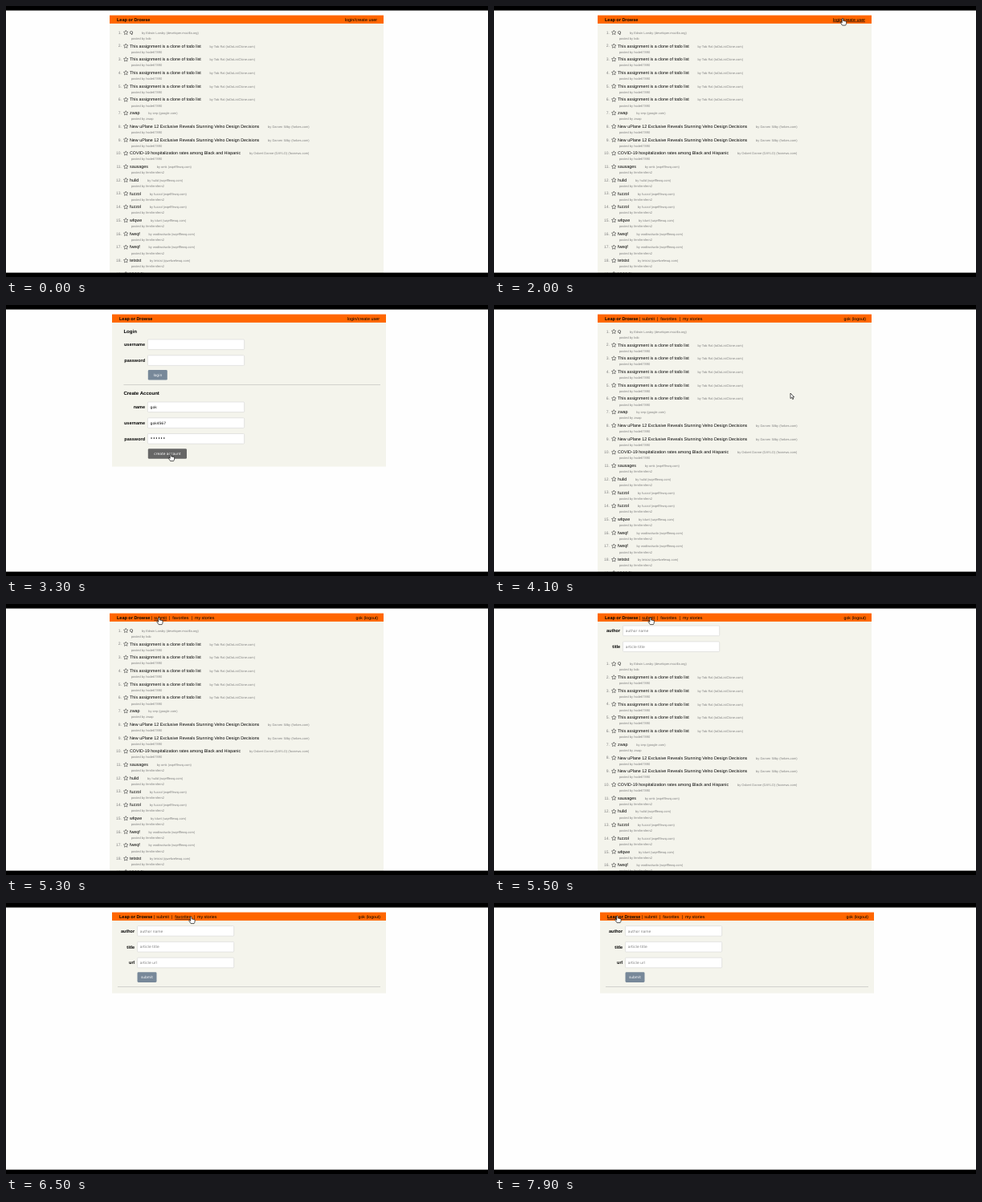
Animation, 600 px wide and 338 px high, one loop 8000 ms. Source, as an HTML page:

```html
<!DOCTYPE html>
<html lang="en">
<head>
<meta charset="utf-8">
<title>Story list</title>
<style>
  html, body { margin: 0; width: 100%; height: 100%; overflow: hidden; background: #fefefe; }
  svg { display: block; width: 100vw; height: 100vh; }
  text { font-family: "Liberation Sans", Arial, sans-serif; font-size: 5.35px; text-rendering: geometricPrecision; white-space: pre; }
  .brand { font-weight: bold; font-size: 5.5px; }
  .small { font-size: 4px; fill: #828282; }
  .num { font-size: 5px; fill: #828282; text-anchor: end; }
  .label { font-weight: bold; font-size: 5.5px; text-anchor: end; }
  .head { font-weight: bold; font-size: 6.05px; }
  .field, .btn { font-family: "DejaVu Sans", sans-serif; font-size: 4.45px; }
  .hint { fill: #7c7c7c; }
  .dots { font-size: 5.3px; }
  .btn { fill: #fff; text-anchor: middle; }
  .end { text-anchor: end; }
  .on { text-decoration: underline; }
  .star { fill: none; stroke: #444; stroke-width: .6; stroke-linejoin: round; }
</style>
</head>
<body>
<svg viewBox="0 0 600 338">
  <defs>
    <clipPath id="clipLogin"><rect x="129" y="22" width="341" height="0"/></clipPath>
    <clipPath id="clipCreate"><rect x="129" y="22" width="341" height="0"/></clipPath>
    <clipPath id="clipSubmit"><rect x="129" y="22" width="341" height="0"/></clipPath>
  </defs>
  <rect width="600" height="338" fill="#fefefe"/>
  <g id="page">
    <rect id="sheet" x="129" y="12" width="341" height="320" fill="#f4f4ec"/>
    <g id="list"></g>
    <g clip-path="url(#clipLogin)"><g id="login"></g></g>
    <g clip-path="url(#clipCreate)"><g id="create"></g></g>
    <g clip-path="url(#clipSubmit)"><g id="submit"></g></g>
    <rect x="129" y="11.6" width="341" height="10.3" fill="#ff6600"/>
    <text class="brand link" x="138" y="18.9">Leap or Drowse</text>
    <text id="guest" class="link end" x="462" y="18.6" style="font-size:5.45px">login/create user</text>
    <g id="member">
      <text x="180.4" y="18.9">|</text>
      <text class="link" x="184.3" y="18.9">submit</text>
      <text x="203" y="18.9">|</text>
      <text class="link" x="207.3" y="18.9">favorites</text>
      <text x="231" y="18.9">|</text>
      <text class="link" x="235" y="18.9">my stories</text>
      <text class="end" x="463" y="18.9" style="font-size:5.2px">gok (logout)</text>
    </g>
  </g>
  <path id="cursor" fill="#fff" stroke="#111" stroke-width=".7" stroke-linejoin="round"/>
  <rect width="600" height="5.6"/>
  <rect y="332.6" width="600" height="6"/>
</svg>
<script>
const LOOP = 8000, STEP = 100;
const $ = id => document.getElementById(id);

function add(parent, tag, attrs, text) {
  const el = document.createElementNS("http://www.w3.org/2000/svg", tag);
  for (const k in attrs) el.setAttribute(k, attrs[k]);
  if (text) el.textContent = text;
  parent.appendChild(el);
  return el;
}

// Stories: title, author and host, poster
const todo = ["This assignment is a clone of todo list", "Tob Ral (toDoListClone.com)", "hode67890"];
const phone = ["New uPlane 12 Exclusive Reveals Stunning Velno Design Decisions", "Darven Silby (forbes.com)", "hode67890"];
const junk = (title, by, host = "wqefffewq.com") => [title, `${by} (${host})`, "fernfernfern2"];
const stories = [
  ["Q", "Edwin Larsby (developer.mozilla.org)", "kob"],
  todo, todo, todo, todo, todo,
  ["zwap", "zep (google.com)", "zwap"],
  phone, phone,
  ["COVID-19 hospitalization rates among Black and Hispanic", "Osbert Danne (DAYLO) (foxnews.com)", "hode67890"],
  junk("sausages", "omk"), junk("hulid", "hulid"),
  junk("fuzzol", "fuzzol"), junk("fuzzol", "fuzzol"),
  junk("wfqwe", "tdwrt"),
  junk("fweqf", "wodtwotwdo"), junk("fweqf", "wodtwotwdo"),
  junk("tetstst", "letstst", "qwefwefewq.com"),
  junk("Hiddulit", "omk")
];

function starPoints(cx, cy, r) {
  return Array.from({ length: 10 }, (_, i) => {
    const a = i * Math.PI / 5, d = i % 2 ? r * .48 : r;
    return `${(cx + d * Math.sin(a)).toFixed(2)},${(cy - d * Math.cos(a)).toFixed(2)}`;
  }).join(" ");
}

stories.forEach(([title, by, poster], i) => {
  const y = 34.8 + i * 16.73, list = $("list");
  add(list, "text", { class: "num", x: 144, y: y - .1 }, `${i + 1}.`);
  add(list, "polygon", { class: "star", points: starPoints(149.2, y - 1.6, 2.9) });
  const line = add(list, "text", { x: 154, y }, title);
  add(line, "tspan", { class: "small", dx: 10.8 }, `by ${by}`);
  add(list, "text", { class: "small", x: 155.7, y: y + 7.1 }, `posted by ${poster}`);
});

function field(g, y, label, x, value, style = "") {
  add(g, "text", { class: "label", x: x - 3.4, y: y + 8.2 }, label);
  add(g, "rect", { x, y, width: 120.2, height: 12.6, rx: 1, fill: "#fff", stroke: "#ccc", "stroke-width": .5 });
  if (value) add(g, "text", { class: "field " + style, x: x + 3.2, y: y + 7.9 }, value);
}
function button(g, x, y, width, text) {
  const box = add(g, "rect", { x, y, width, height: 12.6, rx: 1.4, fill: "#778899" });
  add(g, "text", { class: "btn", x: x + width / 2, y: y + 7.9 }, text);
  return box;
}
function rule(g, x, y) {
  add(g, "rect", { x, y, width: 463 - x, height: .7, fill: "#c4c4c0" });
}

const login = $("login"), create = $("create"), submit = $("submit");
add(login, "text", { class: "head", x: 143.4, y: 34.5 }, "Login");
field(login, 43, "username", 173.4);
field(login, 62.8, "password", 173.4);
button(login, 173.8, 81, 24, "login");
rule(login, 143.4, 99.2);

add(create, "text", { class: "head", x: 143.4, y: 112.4 }, "Create Account");
field(create, 121, "name", 173.4, "gok");
field(create, 140.8, "username", 173.4, "gok4567");
field(create, 160.5, "password", 173.4, "••••••", "dots");
const createBtn = button(create, 173.8, 179.2, 48.2, "create account");

field(submit, 28.6, "author", 160.5, "author name", "hint");
field(submit, 48.4, "title", 160.5, "article title", "hint");
field(submit, 68.2, "url", 160.5, "article url", "hint");
button(submit, 160.5, 86.3, 24, "submit");
rule(submit, 136, 104.3);

const links = [...document.querySelectorAll(".link")];
const HAND = "M-.8,.8a.8,.8 0 0 1 1.6,0V3L3.6,3.4Q4.6,3.6 4.6,4.6V6Q4.4,7.4 3.6,8.6H-.4L-2.6,5.4Q-3,4.4 -2,4.4L-.8,5.4Z";
const ARROW = "M0,0V6.6L1.6,5.2L2.7,7.6L3.8,7.1L2.7,4.8H4.7Z";

// Pointer tip: time, x, y
const path = [
  [300, 555, 264], [500, 470, 200], [700, 368, 130], [900, 402, 82], [1100, 450, 54],
  [1400, 440, 28], [1600, 432, 17], [1800, 434, 15.5], [2000, 434, 15.5], [2200, 431.5, 19.5],
  [2400, 400, 52], [2800, 235, 168], [3000, 207, 185], [3300, 205, 186], [3500, 211, 180],
  [3700, 211, 180], [3900, 255, 160], [4200, 426, 85], [4400, 370, 26], [4600, 232, 11],
  [4900, 171, 9], [5100, 189.5, 16.6], [5200, 189.5, 16.6], [5300, 190.5, 17], [5700, 199, 17],
  [6100, 206, 17], [6300, 215, 17], [6700, 246, 17], [7000, 250, 15.5], [7100, 247.5, 15.5],
  [7200, 247.5, 15.5], [7900, 153.5, 16], [8000, 153.5, 16]
];

function tipAt(t) {
  const i = Math.max(1, path.findIndex(p => p[0] >= t));
  const [t0, x0, y0] = path[i - 1], [t1, x1, y1] = path[i];
  const k = (t - t0) / (t1 - t0);
  return [x0 + (x1 - x0) * k, y0 + (y1 - y0) * k];
}
function swing(t, start) {
  const k = Math.min(1, Math.max(0, (t - start) / 400));
  return .5 - Math.cos(k * Math.PI) / 2;
}
const show = (el, on) => { el.style.display = on ? "" : "none"; };
const move = (el, x, y) => el.setAttribute("transform", `translate(${x} ${y})`);
function clip(id, bottom) {
  $(id).firstElementChild.setAttribute("height", Math.max(0, bottom - 22));
}

function render(t) {
  const account = t >= 2100 && t < 3500;
  const empty = t >= 6400;
  const shift = account || empty ? 3 : 0;
  const a = account ? swing(t, 1990) : 0;
  const s = swing(t, 5300);
  const bottom = account ? 201.5 - 180 * (1 - a) : empty ? 112.5 : 333;

  move($("page"), shift, 0);
  $("sheet").setAttribute("height", bottom - 12);
  show($("list"), !account && !empty);
  move($("list"), 0, 83.2 * s);
  show($("guest"), t < 3500);
  show($("member"), t >= 3500);

  show(login, account);
  show(create, account);
  move(login, 0, -3 * (1 - a));
  move(create, 0, -81 * (1 - a));
  clip("clipLogin", 22 + 79 * a);
  clip("clipCreate", bottom);
  move(submit, 0, -3 * (1 - s));
  clip("clipSubmit", 22 + 83.2 * s);

  const visible = t >= 300;
  show($("cursor"), visible);
  let hand = false;
  if (visible) {
    const [x, y] = tipAt(t), px = x - shift;
    for (const el of links) {
      const box = el.getBBox();
      const over = y >= 14 && y <= 22 && box.width > 0 && px >= box.x && px <= box.x + box.width;
      el.classList.toggle("on", over);
      hand = hand || over;
    }
    const press = account && a === 1 && px > 174 && px < 222 && y > 179 && y < 192;
    createBtn.setAttribute("fill", press ? "#666" : "#778899");
    $("cursor").setAttribute("d", hand || press ? HAND : ARROW);
    move($("cursor"), x, y);
  } else {
    links.forEach(el => el.classList.remove("on"));
  }
}

const begin = performance.now();
function tick() {
  const t = Math.max(0, performance.now() - begin) % LOOP;
  render(Math.floor(t / STEP) * STEP);
  requestAnimationFrame(tick);
}
tick();
</script>
</body>
</html>
```
